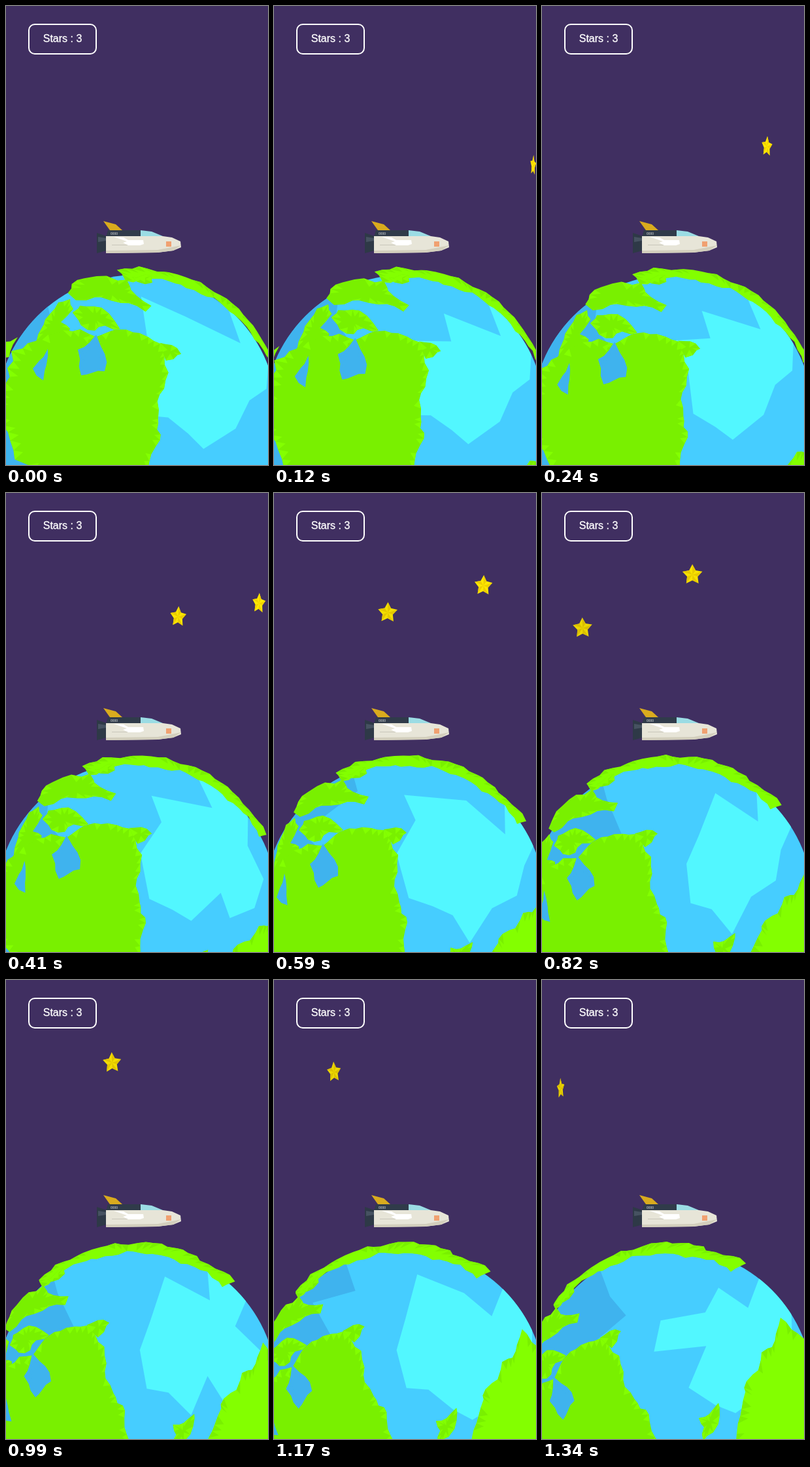
These frames come from a looping animation (401 px wide and 700 px high, 1440 ms). An HTML page with a canvas:

```html
<!DOCTYPE html>
<html lang="en">
<head>
<meta charset="utf-8">
<title>Space flight</title>
<style>
html, body { margin: 0; width: 100%; height: 100%; overflow: hidden; background: #402f61; }
canvas { display: block; }
#score {
  position: absolute; left: 34px; top: 27px; width: 105px; height: 47px;
  box-sizing: border-box; border: 2px solid #fff; border-radius: 10px;
  color: #fff; font: 16px/42px "Liberation Sans", Arial, sans-serif; text-align: center;
  -webkit-text-stroke: .3px #fff;
}
</style>
</head>
<body>
<canvas id="stage" width="401" height="700"></canvas>
<div id="score">Stars : 3</div>
<script>
const ctx = document.getElementById('stage').getContext('2d');
const LOOP = 1440, STEP = 5.82, LAST = 23;
const CX = 200, CY = 625, SEA = 215, LAND = 224, SPIN = 0.0006, MID = 590;
const GREEN = '#79f000', LIME = '#83ff00', BLUE = '#46cdff', DEEP = '#3fb3ee', BRIGHT = '#52f7ff';

const { abs, sin, cos, ceil, floor, hypot, PI } = Math;

// Repeatable noise from -1 to 1.
const noise = n => {
  const v = abs(sin(n * 12.9898) * 43758.5453);
  return (v - floor(v)) * 2 - 1;
};

const range = (n, make) => Array.from({ length: n }, (_, i) => make(i));

const parse = text => {
  const n = text.split(' ').map(Number);
  return range(n.length / 2, i => [n[2 * i], n[2 * i + 1]]);
};

const centre = points => [0, 1].map(k => points.reduce((sum, p) => sum + p[k], 0) / points.length);

function trace(points) {
  points.forEach(([x, y], i) => i ? ctx.lineTo(x, y) : ctx.moveTo(x, y));
  ctx.closePath();
}

function fill(color, ...shapes) {
  ctx.beginPath();
  shapes.forEach(trace);
  ctx.fillStyle = color;
  ctx.fill();
}

// The globe spins about the line of sight; in perspective, nearer points circle a lower centre.
function turn([x, y], angle) {
  const dx = x - CX, dy = y - CY;
  const depth = Math.sqrt(Math.max(0, LAND ** 2 - dx * dx - dy * dy));
  const axis = CY + depth * (0.52 + 0.001 * dy);
  const up = axis - y, c = cos(angle), s = sin(angle);
  return [CX + dx * c - up * s, axis - up * c - dx * s];
}

// Breaks straight edges into short ragged ones.
const roughen = points => points.flatMap(([x, y], i) => {
  const [x2, y2] = points[(i + 1) % points.length];
  const n = ceil(hypot(x2 - x, y2 - y) / 14);
  return range(n, j => {
    const wobble = j ? 3 : 0, seed = x * 7 + y + j;
    return [x + (x2 - x) * j / n + wobble * noise(seed), y + (y2 - y) * j / n + wobble * noise(seed + 0.5)];
  });
});

// Low-poly slopes along part of the coast.
function slopes(coast, width) {
  const [cx, cy] = centre(coast);
  return range(coast.length, i => {
    const a = coast[i], b = coast[(i + 1) % coast.length];
    const [mx, my] = centre([a, b]), d = hypot(cx - mx, cy - my) || 1;
    return [a, b, [mx + (cx - mx) * width / d, my + (cy - my) * width / d]];
  }).filter((_, i) => noise(i + cx) > -0.2);
}

function land(at, color, points, slopeColor = color, width = 10) {
  const coast = roughen(points);
  return { at, color, coast, slopeColor, facets: slopes(coast, width) };
}

const rim = (from, to, radius) => range(15, i => {
  const a = from + (to - from) * i / 14, r = radius + 2 * noise(i + radius);
  return [CX + r * cos(a), CY - r * sin(a)];
});

const west = text => land(MID, GREEN, parse(text), LIME);
const lands = [
  land(MID, LIME, [...rim(0.59, 2.06, 224), ...rim(2.05, 0.61, 210)], GREEN, 12),
  west('112 430 140 418 142 428 120 435'),
  west('30 487 43 462 66 447 105 437 112 450 145 463 138 475 112 471 72 477 40 494'),
  land(0, GREEN, parse('40 517 60 478 80 452 98 447 103 462 84 482 98 492 90 525'), LIME),
  land(0, LIME, parse('-20 540 0 512 18 505 5 535')),
  west('38 514 46 500 75 492 106 514 76 522 62 532'),
  west('75 538 100 517 125 512 168 514 190 552 184 600 192 625 195 641 204 655 198 680 204 740 200 800 32 755 -10 700 -20 600 0 575 30 545 52 535'),
  west('168 513 186 510 203 518 193 530 182 536'),
  land(MID, DEEP, parse('55 566 68 550 75 535 98 570 98 584 68 602')),
  west('55 550 66 540 72 541 64 556'),
  land(0, DEEP, parse('41 553 64 523 57 571')),
  land(1340, LIME, parse('365 515 401 547 440 640 400 790 290 780 298 692 308 640 313 612 331 595 336 568 352 560'), GREEN, 14),
  land(1340, GREEN, parse('270 645 272 664 262 690 247 703 248 682 240 668 256 662'), LIME)
];

function drawLand({ at, color, coast, slopeColor, facets }, t) {
  const move = points => points.map(p => turn(p, (t - at) * SPIN));
  ctx.save();
  fill(color, move(coast));
  ctx.clip();
  fill(slopeColor, ...facets.map(move));
  ctx.restore();
}

// Jittered water mesh; each facet takes its shade from where it stands under the fixed light.
function drawSea(t) {
  const vertex = (i, j) => {
    const seed = i * 17 + j * 5.3;
    const y = 400 + 54 * j + 13 * noise(seed);
    return turn([CX, y], i * 0.35 + 0.09 * noise(seed + 1) + (t - MID) * SPIN);
  };
  const bright = [], deep = [];
  for (let i = -7; i < 7; i++) {
    for (let j = 0; j < 6; j++) {
      const facet = [vertex(i, j), vertex(i + 1, j), vertex(i + 1, j + 1), vertex(i, j + 1)];
      const [x, y] = centre(facet);
      if (hypot(x - 295, y - 552) < 92) bright.push(facet);
      else if (x < 88) deep.push(facet);
    }
  }
  ctx.save();
  ctx.beginPath();
  ctx.arc(CX, CY, SEA, 0, PI * 2);
  ctx.fillStyle = BLUE;
  ctx.fill();
  ctx.clip();
  fill(DEEP, ...deep);
  fill(BRIGHT, ...bright);
  ctx.restore();
}

// Each star circles far below the stage and spins about its own upright axis.
const stars = [
  { x: 193, y: 552, radius: 370, speed: 0.00135, top: 552, facing: 700 },
  { x: 205, y: 520, radius: 396, speed: 0.00101, top: 883, facing: 800 }
];

function drawStar(star, t) {
  const angle = (star.top - t) * star.speed, spin = (t - star.facing) * 0.0022;
  const x = star.x + star.radius * sin(angle), y = star.y - star.radius * cos(angle);
  const light = 48 + 3 * sin(angle * 2);
  const tip = n => {
    const r = n % 2 ? 8.5 : 16, a = n * PI / 5 - 0.1 * sin(spin);
    return [x + r * sin(a) * cos(spin), y - r * cos(a)];
  };
  fill(`hsl(55 100% ${light}%)`, range(10, tip));
  fill(`hsl(52 100% ${light - 3}%)`, ...range(5, n => [[x, y], tip(2 * n), tip(2 * n + 1)]));
}

const ship = [
  ['#2e3947', '139 346 154 351 154 373 139 377'],
  ['#465261', '141 352 153 354 153 358 141 360'],
  ['#d9ab1e', '149 328 168 333 178 342 159 342'],
  ['#303b4a', '156 342 206 342 206 352 153 352'],
  ['#9bdce4', '206 342 223 344 240 351 206 352'],
  ['#e7e5d8', '153 351 240 351 254 353 267 359 268 368 256 373 232 376 153 377'],
  ['#d3cfbd', '153 373 232 372 268 365 256 373 232 376 153 377'],
  ['#c9c7bb', '162 364 188 364 188 365 162 365'],
  ['#ffffff', '165 352 180 353 187 357 210 357 211 363 205 365 187 365 179 361 185 359'],
  ['#f0a171', '245 359 253 359 253 367 245 367']
].map(([color, text]) => [color, parse(text)]);

function drawShip() {
  for (const [color, points] of ship) fill(color, points);
  ctx.fillStyle = '#a9afb5';
  ctx.font = 'bold 5px "Liberation Sans", Arial, sans-serif';
  ctx.fillText('0000', 160, 349);
}

// Poses change in even steps, rounded to hundredths of a second; the last one is held.
const pose = ms => ceil(Math.min(LAST, floor(floor(ms / 10) / STEP)) * STEP) * 10;

function frame() {
  const t = pose(performance.now() % LOOP);
  ctx.fillStyle = '#402f61';
  ctx.fillRect(0, 0, 401, 700);
  drawSea(t);
  lands.forEach(item => drawLand(item, t));
  stars.forEach(star => drawStar(star, t));
  drawShip();
  requestAnimationFrame(frame);
}
frame();
</script>
</body>
</html>
```
